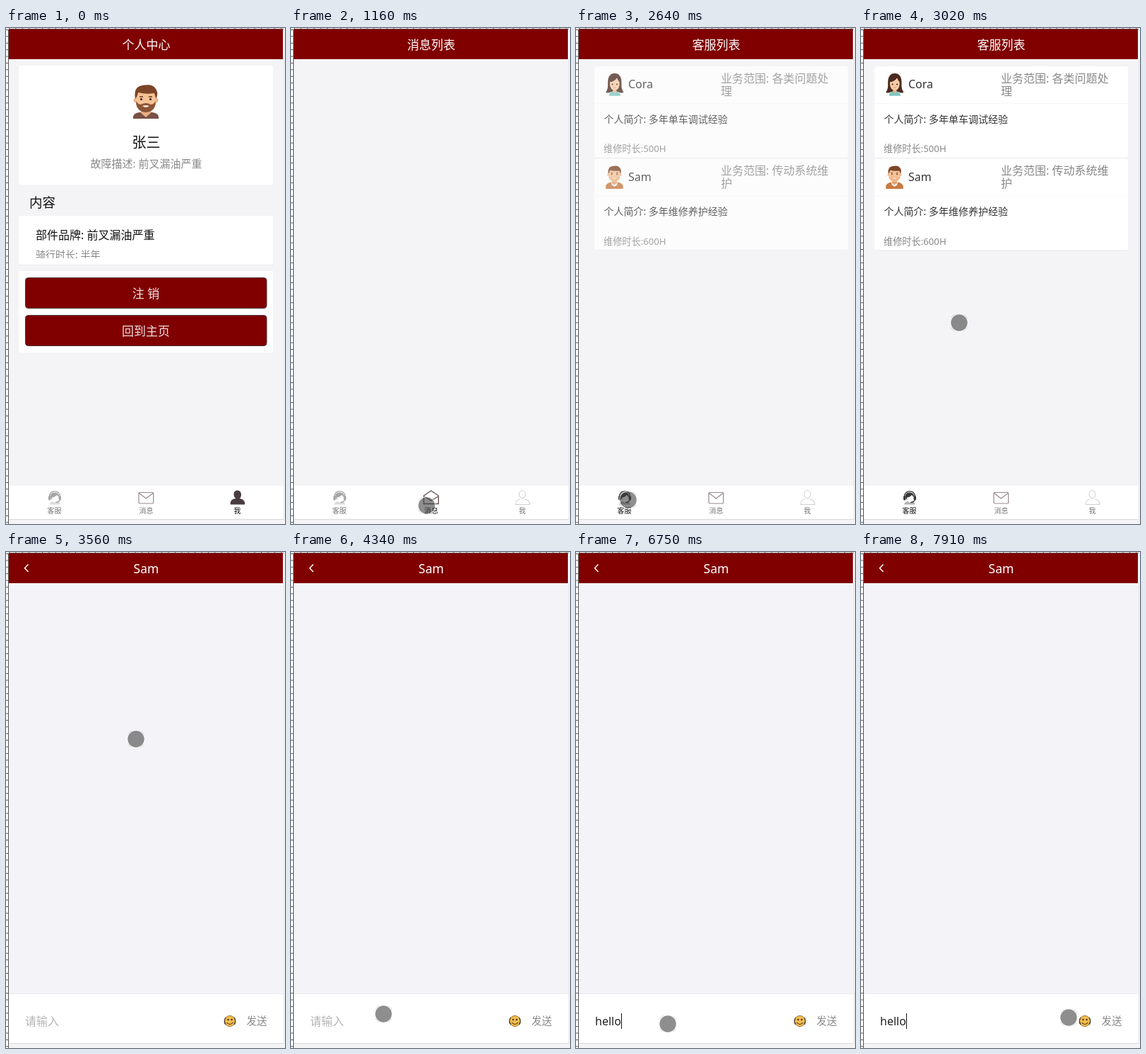
An HTML page that plays this animation: 395x700 px, repeating every 7990 ms.

```html
<!DOCTYPE html>
<html lang="zh-CN">
<head>
<meta charset="utf-8">
<title>个人中心</title>
<style>
html, body { margin: 0; width: 100%; height: 100%; overflow: hidden; background: #f4f4f6; }
svg { display: block; width: 395px; height: 700px; font-family: "Noto Sans", "Noto Sans CJK SC", "Noto Sans CJK", sans-serif; }
text { white-space: pre; }
</style>
</head>
<body>
<svg id="stage" viewBox="0 0 395 700"></svg>
<script>
const LOOP = 7990;
const RED = '#800000';
const PAGE = { me: 0, messages: 1, service: 2, chat: 3 };

// Static drawing helpers; text is placed by its vertical centre.
const text = (x, cy, size, fill, str, anchor = 'start', weight = 400) =>
  `<text x="${x}" y="${cy + size * .37}" font-size="${size}" fill="${fill}" text-anchor="${anchor}" font-weight="${weight}">${str}</text>`;
const rect = (x, y, w, h, fill, extra = '') =>
  `<rect x="${x}" y="${y}" width="${w}" height="${h}" fill="${fill}" ${extra}/>`;
const dot = (x, y, r, fill, extra = '') =>
  `<circle cx="${x}" cy="${y}" r="${r}" fill="${fill}" ${extra}/>`;
const path = (d, fill, extra = '') => `<path d="${d}" fill="${fill}" ${extra}/>`;
const line = (d, stroke, width = 1) => path(d, 'none', `stroke="${stroke}" stroke-width="${width}"`);
const group = (id, body, extra = '') => `<g id="${id}" ${extra}>${body}</g>`;
const place = (x, y, scale, body) => `<g transform="translate(${x} ${y}) scale(${scale})">${body}</g>`;

// Both men share a head; only beard, shirt and proportions vary.
const manHead = beard =>
  dot(3.5, 22, 3, '#efb485') + dot(32.5, 22, 3, '#efb485') +
  path('M4 10H32V25Q31 38 18 38Q5 38 4 25Z', '#f6c294') +
  path('M4 23Q7 28 11 28Q18 24 25 28Q29 28 32 23Q32 38 18 39Q4 38 4 23Z', beard) +
  path('M13 30Q18 28 23 30Q18 34 13 30Z', '#f7e6d8') +
  path('M3 20Q0 3 13 1Q28-2 32 6Q36 10 33 20Q31 17 30 12Q18 14 7 11Q6 17 3 20Z', '#7d4527') +
  dot(11.5, 20.5, 1.6, '#3b241b') + dot(24.5, 20.5, 1.6, '#3b241b') +
  line('M9 17H14M22 17H27', '#6b3d25', 1.3);

const client =
  path('M0 48V45Q1 40 9 39H27Q35 40 36 45V48Z', '#795046') +
  path('M11 34H25V40L18 46L11 40Z', '#e9ae7f') +
  manHead('#8a5435');

const mechanic =
  path('M1 45V40Q2 34 11 32H25Q34 34 35 40V45Z', '#c9793f') +
  path('M11 31H25L23 38L18 41L13 38Z', '#f3efe9') +
  path('M13 27H23V34L18 37L13 34Z', '#e2a473') +
  place(3.6, 0, .8, manHead('#f0b88a'));

const woman =
  path('M1 37Q6 31 5 19Q5 0 18.5 0Q32 0 32 19Q31 31 36 37Q31 40 26 36H11Q6 40 1 37Z', '#4b2b20') +
  path('M7 44Q8 36 15 35H22Q29 36 30 44Z', '#7fc5c0') +
  path('M15 29H22V36L18.5 39L15 36Z', '#eab58d') +
  path('M9 17Q18 16 23 9Q25 14 28 17V22Q27 33 18.5 33Q10 33 9 22Z', '#f8cba4') +
  dot(14, 21.5, 1.4, '#33211c') + dot(23, 21.5, 1.4, '#33211c') +
  path('M16 27.5Q18.5 29.5 21 27.5Z', '#d55a55');

const header = title => text(198.5, 23.5, 17, '#fff', title, 'middle');

const button = (y, label) =>
  rect(27.5, y + .5, 341.5, 43, RED, 'rx="4" stroke="#4a3038"') +
  text(198, y + 23, 17, '#eee0e0', label, 'middle', 500);

const mePage = header('个人中心') +
  rect(18, 53, 360, 168, '#fff') +
  place(180, 80, 1, client) +
  text(198.5, 162, 20, '#111', '张三', 'middle') +
  text(198.5, 191, 15, '#888', '故障描述: 前叉漏油严重', 'middle') +
  text(33, 246, 18.5, '#111', '内容') +
  rect(18, 265, 360, 69, '#fff') + rect(18, 334, 360, 1, '#e9e9eb') +
  text(42, 292, 16, '#111', '部件品牌: 前叉漏油严重') +
  text(42, 319.5, 14, '#888', '骑行时长: 半年') + rect(40, 325, 100, 9, '#fff') +
  rect(18, 343, 360, 115, '#fff') +
  button(352, '注 销') + button(405, '回到主页');

const serviceCard = (y, avatar, name, scope, intro, hours) =>
  rect(19, y, 359, 129, '#fff', 'rx="4"') +
  rect(21, y + 129, 355, 1, '#ececee') + rect(19, y + 52, 359, 1, '#f7f7f7') +
  place(34.5, y + 10, .72, avatar) +
  text(67, y + 25.5, 16, '#333', name) +
  text(198, y + 17, 16, '#888', scope[0]) + text(198, y + 35, 16, '#888', scope[1]) +
  text(32.5, y + 74.5, 14, '#333', '个人简介: ' + intro) +
  text(32, y + 116.5, 13.2, '#888', '维修时长:' + hours);

const serviceList =
  serviceCard(54, woman, 'Cora', ['业务范围: 各类问题处', '理'], '多年单车调试经验', '500H') +
  serviceCard(184.5, mechanic, 'Sam', ['业务范围: 传动系统维', '护'], '多年维修养护经验', '600H');

const emoji = dot(317, 662, 7.6, '#f2bd4b', 'stroke="#8a5a20" stroke-width=".8"') +
  line('M311 657Q307.5 662 311 667M323 657Q326.5 662 323 667', '#3a2a20', 1.2) +
  dot(314.5, 660, 1.2, '#3a2a20') + dot(319.5, 660, 1.2, '#3a2a20') +
  line('M312.5 664Q317 669 321.5 664', '#3a2a20', 1.1);

const chatPage = rect(4, 44, 389, 580, '#f4f4f8') +
  line('M31.5 17.5L26.5 22.8L31.5 28', '#fff', 1.5) +
  text(198.5, 24, 17.5, '#fff', 'Sam', 'middle', 500) +
  rect(4, 624, 389, 69, '#fff') + rect(4, 623, 389, 1, '#ececf0') +
  group('hint', text(27, 662, 16, '#b4b4b4', '请输入')) +
  `<text id="typed" x="27" y="668" font-size="16" fill="#222"></text>` +
  rect(0, 651, 1, 22, '#111', 'id="caret"') +
  emoji + text(340.5, 662, 14.5, '#888', '发送');

const headset = color =>
  path('M61 672.5Q62 669 66 668L69 670L73 668Q76 669 77 672.5Z', color, 'opacity=".4"') +
  line('M61.5 661Q62 653.8 69 653.8Q76 653.8 76.5 661', color, 1.3) +
  path('M63 661Q62.5 655.5 69 655.5Q75.5 655.5 75 662Q73 661 72 659Q68 663 65 662.5L65.5 666Q63 664 63 661Z', color) +
  rect(60, 660, 3.4, 6.5, color, 'rx="1.6"') + rect(74.6, 660, 3.4, 6.5, color, 'rx="1.6"') +
  line('M76 666Q75 669.5 70 669.5', color, 1.2);
const envelope =
  line('M189 655.5H207.5Q208.7 655.5 208.7 657V669.5Q208.7 671 207.5 671H189.5Q188 671 188 669.5V657Q188 655.5 189 655.5ZM188.5 656.5L198.3 664L208.2 656.5', '#97898b', 1.2);
const openEnvelope = line('M188 660L198.3 653L208.7 660V671.5H188ZM188.5 661L198.3 667L208.5 661', '#685052', 1.4);
const personShape = 'M327.5 652.5C321 652.5 321.5 662 325.5 664C318.5 665 317.5 668 317.8 672.5H338.2C338.5 668 336.5 665 330.5 664C334.5 662 334 652.5 327.5 652.5Z';
const personOutline = line('M327.5 652.8C321.5 652.8 321.5 663.5 327.5 663.5C333.5 663.5 333.5 652.8 327.5 652.8ZM324 665C318.5 666 318 669 318 672.5H338C338 669 336.5 666 331 665', '#cfcfcf', 1.1);

// Each tab: label centre, label, resting icon, selected icon.
const tabs = [
  [68.5, '客服', headset('#a5a5a5'), headset('#383838')],
  [198.5, '消息', envelope, openEnvelope],
  [327.5, '我', personOutline, path(personShape, '#483c40')]
];
const tabBar = selected => rect(4, 646, 389, 47, '#fff') +
  tabs.map(([x, label, rest, active], i) => (i === selected ? active : rest) +
    text(x, 681, 10, i === selected ? '#111' : '#777', label, 'middle', i === selected ? 500 : 400)).join('');

// Ruler marks every ten units of a 414-unit screen drawn 389 pixels wide.
const MARK = 3890 / 414;
const frame =
  `<defs><pattern id="sideTicks" y="2" width="4" height="${MARK}" patternUnits="userSpaceOnUse">${rect(0, 0, 4, 1, '#555')}</pattern>
  <pattern id="topTicks" x="4" width="${MARK}" height="2" patternUnits="userSpaceOnUse">${rect(0, 0, 1, 2, '#555')}</pattern></defs>` +
  rect(0, 0, 395, 700, '#f4f4f6') + rect(0, 0, 395, 2, '#fff') + rect(0, 0, 4, 700, '#fff') +
  rect(0, 0, 395, 2, 'url(#topTicks)') + rect(0, 0, 4, 700, 'url(#sideTicks)') +
  rect(3, 2, 1, 698, '#555') + rect(4, 1, 389, 1, '#6b4040') +
  rect(4, 2, 388, 42, RED);

document.getElementById('stage').innerHTML = frame +
  group('page0', mePage + tabBar(2)) +
  group('page1', header('消息列表') + tabBar(1)) +
  group('page2', header('客服列表') + group('list', serviceList) + tabBar(0)) +
  group('page3', chatPage) +
  rect(4, 693, 389, 1, '#d9d9dc') + rect(393, 44, 1, 650, '#e6e6e9') +
  group('cursor', dot(0, 0, 12.4, 'none', 'stroke="#fff" stroke-width="1.2" opacity=".7"') +
    dot(0, 0, 13.2, 'none', 'stroke="#999" stroke-width=".6" stroke-dasharray="7 13.73" stroke-dashoffset="-7" opacity=".7"') +
    dot(0, 0, 11.7, '#3c3c3c', 'opacity=".58"'));

const $ = id => document.getElementById(id);
const pages = [0, 1, 2, 3].map(i => $('page' + i));
const list = $('list'), cursor = $('cursor'), hint = $('hint'), typed = $('typed'), caret = $('caret');
const show = (el, on) => el.setAttribute('display', on ? 'inline' : 'none');

const switches = [[0, PAGE.me], [1160, PAGE.messages], [2410, PAGE.service], [3560, PAGE.chat]];
const typing = [[0, 0], [5730, 1], [5880, 2], [6280, 3], [6430, 4], [6750, 5]];
const carets = [[0, 0], [4720, 1], [5190, 0], [5730, 1], [7210, 0], [7610, 1]];
const route = [
  [400, 150, 682], [703, 212, 666], [930, 192, 674], [1160, 192, 674],
  [1930, 80, 667], [2010, 76, 666], [2410, 76, 666], [2560, 74, 666], [2640, 74, 666],
  [3020, 139, 416], [3330, 184, 264], [3803, 184, 264], [4340, 131, 652],
  [4490, 130, 666], [7535, 130, 666], [7685, 200, 685], [7910, 294, 657]
];
const TICK = 76;

const valueAt = (table, t) => table.filter(row => row[0] <= t).pop()[1];

// The pointer moves in short even steps between route points.
function pointAt(t) {
  const i = route.findIndex(p => p[0] > t);
  if (i < 0) return route[route.length - 1].slice(1);
  const [t0, x0, y0] = route[i - 1], [t1, x1, y1] = route[i];
  const steps = Math.max(1, Math.round((t1 - t0) / TICK));
  const k = Math.floor((t - t0) / (t1 - t0) * steps + .001) / steps;
  return [x0 + (x1 - x0) * k, y0 + (y1 - y0) * k];
}

function render(t) {
  const page = valueAt(switches, t);
  pages.forEach((el, i) => show(el, i === page));

  const remaining = 1 - Math.min(1, Math.max(0, (t - 2410) / 460));
  list.setAttribute('transform', `translate(${28 * remaining ** 2} 0)`);
  list.setAttribute('opacity', 1 - remaining ** 2);

  show(cursor, t >= 400);
  if (t >= 400) cursor.setAttribute('transform', `translate(${pointAt(t)})`);

  if (page === PAGE.chat) {
    const count = valueAt(typing, t);
    typed.textContent = 'hello'.slice(0, count);
    show(hint, !count);
    show(caret, valueAt(carets, t));
    caret.setAttribute('x', Math.round(27 + (count ? typed.getComputedTextLength() : .5)));
  }
}

const start = performance.now();
function loop() {
  render((performance.now() - start) % LOOP);
  requestAnimationFrame(loop);
}
loop();
</script>
</body>
</html>
```
